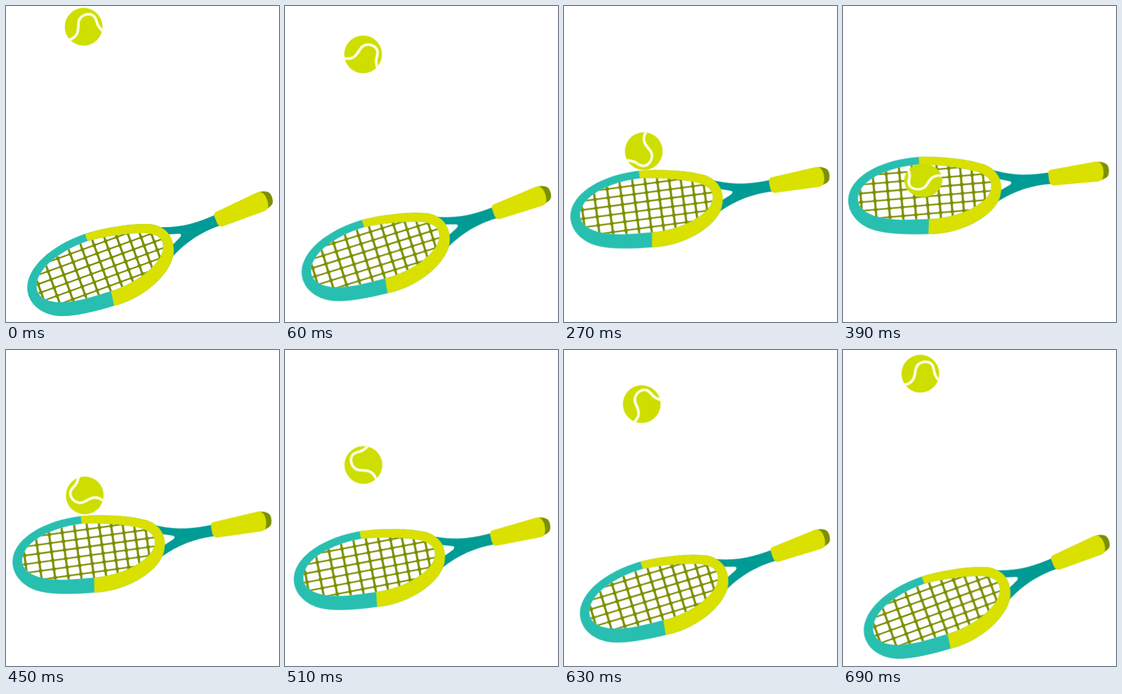
These frames come from a looping animation (415x480 px, 720 ms). An HTML page:

```html
<!DOCTYPE html>
<html lang="en">
<head>
<meta charset="utf-8">
<title>Tennis racket and ball</title>
<style>
  html, body { margin: 0; width: 100%; height: 100%; overflow: hidden; background: #fff; }
  svg { display: block; width: 100%; height: 100%; }

  /* 24 steps of 30 ms; each segment advances once per step */
  .swing, .fly, .squash, .spin { animation: 720ms infinite; }
  .swing { transform-origin: 561px 269px; animation-name: swing; }
  .fly { animation-name: fly; }
  .squash { animation-name: squash; }
  .spin { animation-name: spin; }

  @keyframes swing {
    0% { transform: rotate(0deg); animation-timing-function: steps(11); }
    45.8333% { transform: rotate(15.05deg); animation-timing-function: steps(1); }
    50% { transform: rotate(15.6deg); animation-timing-function: steps(1); }
    54.1667% { transform: rotate(15deg); animation-timing-function: steps(10); }
    95.8333%, 100% { transform: rotate(.25deg); }
  }
  @keyframes fly {
    0% { transform: translate(118px, 31.5px); animation-timing-function: steps(11); }
    45.8333% { transform: translate(122px, 262.5px); animation-timing-function: steps(1); }
    50% { transform: translate(122.3px, 265px); animation-timing-function: steps(1); }
    54.1667% { transform: translate(122px, 264.8px); animation-timing-function: steps(1); }
    58.3333% { transform: translate(120px, 244px); animation-timing-function: steps(9); }
    95.8333%, 100% { transform: translate(117.6px, 36px); }
  }
  @keyframes squash {
    0% { transform: scale(1, 1); animation-timing-function: steps(1); }
    45.8333% { transform: scale(1, .94); animation-timing-function: steps(1); }
    50% { transform: scale(1.02, .82); animation-timing-function: steps(1); }
    54.1667% { transform: scale(1.01, .89); animation-timing-function: steps(1); }
    58.3333%, 100% { transform: scale(1, 1); }
  }
  @keyframes spin {
    0% { transform: rotate(0deg); animation-timing-function: steps(9); }
    37.5% { transform: rotate(139deg); animation-timing-function: steps(4); }
    54.1667% { transform: rotate(207deg); animation-timing-function: steps(10); }
    95.8333%, 100% { transform: rotate(367deg); }
  }
</style>
</head>
<body>
<svg viewBox="0 0 415 480">
  <defs>
    <path id="hole" d="M46.5 425C46.5 402 76 374 124 357C150 350 180 345 205 345C228 344 239 352 239 366C239 388 205 419 160 433C130 442 108 450 83 450C60 450 46.5 441 46.5 425Z"/>
    <path id="rim" fill-rule="evenodd" d="M32.3 428C32.3 398 66 365 120 346C150 337 185 331 213 331C240 331 255 348 255 372C255 400 217 441.5 165 455.3C135 464 110 471 85 471C55 471 32.3 452 32.3 428Z
      M46.5 425C46.5 402 76 374 124 357C150 350 180 345 205 345C228 344 239 352 239 366C239 388 205 419 160 433C130 442 108 450 83 450C60 450 46.5 441 46.5 425Z"/>
    <clipPath id="inside"><use href="#hole"/></clipPath>
    <clipPath id="front"><path d="M118.5 342L124 357L159.5 433L165.5 460H300V320H118Z"/></clipPath>
    <clipPath id="round"><circle r="28.7"/></clipPath>
  </defs>

  <g class="swing">
    <path fill="#009b95" fill-rule="evenodd" d="M232 336C265 337 290 330 322 315.5L325 333.5C298 343 275 357 253 381L246 376V358L238 342Z
      M244 347L263 346Q268 346 265 351L253 363Z"/>
    <g transform="translate(.4 .8)">
      <path fill="#7c8f00" d="M384 282Q399 278 403 287Q408 298 402 303L396 308Z"/>
      <path fill="#dae000" d="M321 311L380 283Q388 279 394 288Q399 297 398 305Q397 309 392 311L329 334Q323 335 320 328L316 318Q315 313 321 311Z"/>
    </g>
    <g clip-path="url(#inside)">
      <g transform="translate(143 388.3) rotate(-20)" fill="none" stroke="#7c8f00" stroke-linecap="round">
        <path id="mains" stroke-width="2.4"/>
        <path id="crosses" stroke-width="3.3"/>
        <path id="knots" stroke-width="5.8"/>
      </g>
    </g>
    <use href="#rim" fill="#28bfb0"/>
    <use href="#rim" fill="#dae000" clip-path="url(#front)"/>
  </g>

  <g class="fly"><g class="squash"><g class="spin">
    <circle r="28.7" fill="#cede00"/>
    <path clip-path="url(#round)" fill="none" stroke="#fafde6" stroke-width="4.2"
      d="M-27 21C-8 18 -8 6 -8 -4C-8 -14 0 -19 8 -19C17 -19 19 -11 21 -4C23 1 27 5 31 8"/>
  </g></g></g>
</svg>
<script>
  const N = 6;
  const rowY = j => 13.2 * j;
  const colX = i => 18.8 * i - .25 * i * i; // tighter towards the handle
  let mains = '', crosses = '', knots = '';
  for (let i = -N; i <= N; i++) {
    mains += `M-120 ${rowY(i)}H120`;
    crosses += `M${colX(i)} -80V80`;
    for (let j = -N; j <= N; j++) knots += `M${colX(i)} ${rowY(j)}h.01`;
  }
  const draw = (id, d) => document.getElementById(id).setAttribute('d', d);
  draw('mains', mains);
  draw('crosses', crosses);
  draw('knots', knots);
</script>
</body>
</html>
```
